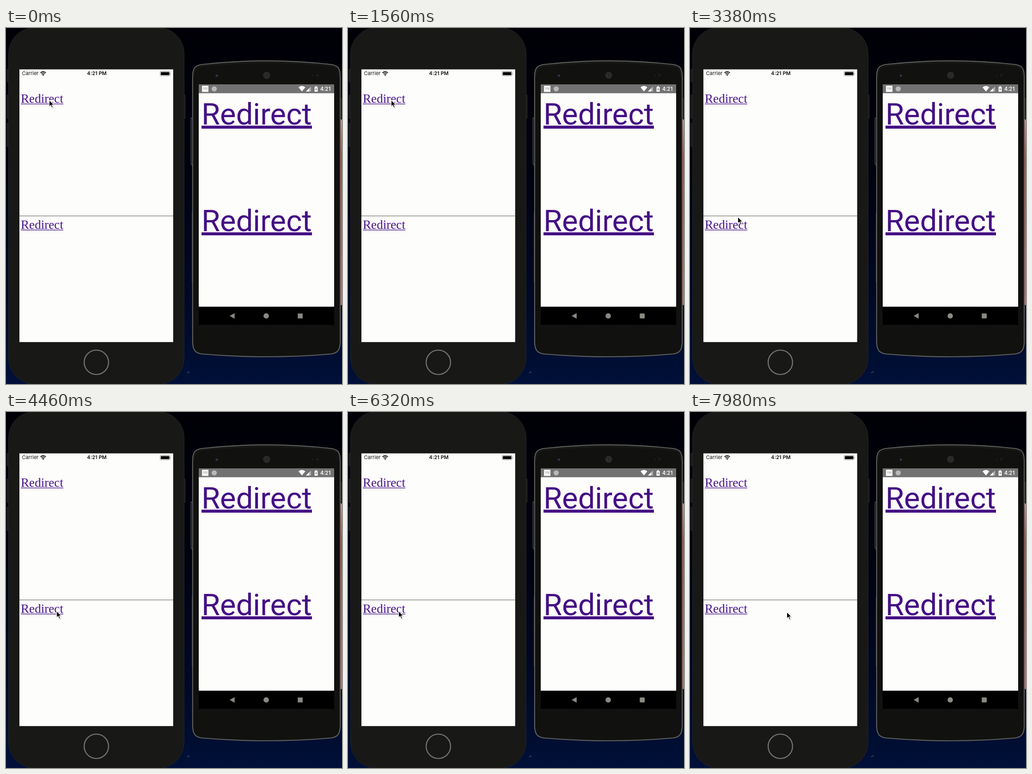
Animation, 727 px wide and 771 px high, one loop 8 s. Source, as an HTML page:

```html
<!DOCTYPE html>
<html lang="en">
<head>
<meta charset="utf-8">
<title>Redirect links on two phones</title>
<style>
  html, body { margin: 0; width: 100%; height: 100%; overflow: hidden; background: #000008; }
  svg { display: block; width: 100%; height: 100%; }
  .ui { font-family: Inter, "Liberation Sans", sans-serif; font-size: 11px; fill: #111; }
  .serif { font-family: "Liberation Serif", serif; font-size: 27.15px; fill: #48148a; }
  .roboto { font-family: Roboto, sans-serif; font-size: 65.1px; fill: #451084; }
  .clock { font-family: Roboto, sans-serif; font-size: 12.2px; font-weight: 500; fill: #fff; }
  .tiny { font-family: Roboto, sans-serif; font-size: 4.5px; fill: #777; }
</style>
</head>
<body>
<svg viewBox="0 0 727 771" xmlns="http://www.w3.org/2000/svg">
  <defs>
    <linearGradient id="night" x1="0" y1="0" x2="0" y2="1">
      <stop offset="0" stop-color="#000006"/>
      <stop offset=".4" stop-color="#00020f"/>
      <stop offset=".75" stop-color="#000824"/>
      <stop offset="1" stop-color="#001038"/>
    </linearGradient>
    <linearGradient id="coral" x1="0" y1="0" x2="0" y2="1">
      <stop offset="0" stop-color="#e88078"/>
      <stop offset=".2" stop-color="#d8402f"/>
      <stop offset="1" stop-color="#dc6258"/>
    </linearGradient>
    <g id="link">
      <text class="serif" x="32" y="162">Redirect</text>
      <rect x="32" y="163.8" width="92" height="1.4" fill="#48148a"/>
    </g>
    <g id="bigLink">
      <text class="roboto" x="423" y="209.3">Redirect</text>
      <rect x="423" y="211.5" width="239" height="6.5" fill="#451084"/>
    </g>
  </defs>

  <rect width="727" height="771" fill="url(#night)"/>
  <rect x="724" y="198" width="3" height="402" fill="url(#coral)"/>
  <path d="M392 747l5-3" stroke="#77809a"/>

  <!-- left phone -->
  <g fill="#191919" stroke="#2b2b2d" stroke-width=".8">
    <rect x="2" y="89" width="6" height="28" rx="1"/>
    <rect x="2" y="145" width="6" height="51" rx="1"/>
    <rect x="2" y="206" width="6" height="51" rx="1"/>
    <rect x="382" y="145" width="6" height="51" rx="1"/>
  </g>
  <rect x="5.5" y="-1" width="380" height="773" rx="57" fill="#181817" stroke="#252526"/>
  <circle cx="195.5" cy="724" r="26.4" fill="none" stroke="#717171" stroke-width="2.4"/>
  <rect x="29" y="89.6" width="332.7" height="590.6" fill="#fdfdfc"/>
  <text class="ui" x="34.5" y="102.4">Carrier</text>
  <g fill="none" stroke="#000" stroke-width="1.9">
    <path d="M74.6 97.2a8.2 8.2 0 0 1 11.6 0"/>
    <path d="M76.8 99.6a5.1 5.1 0 0 1 7.2 0"/>
  </g>
  <path d="M78.3 101.2a3 3 0 0 1 4.2 0l-2.1 2.2z"/>
  <text class="ui" x="196.5" y="102.4" text-anchor="middle" font-weight="600">4:21 PM</text>
  <rect x="333.5" y="94" width="21.4" height="9.6" rx="2.4" fill="none" stroke="#777" stroke-width=".9"/>
  <rect x="335" y="95.5" width="18.4" height="6.6" rx="1.2"/>
  <path d="M356 97.2q1.4 1.6 0 3.2z" fill="#666"/>
  <rect x="29" y="406.5" width="332.7" height="1" fill="#555"/>
  <use href="#link"/>
  <use href="#link" y="273"/>
  <rect id="tap" x="29" y="134" width="97.5" height="36.5" fill="#000" opacity=".33"/>

  <!-- right phone -->
  <path d="M404 195h-3.5v99l3.5 5M403 400v150" fill="none" stroke="#555" stroke-width="1.4"/>
  <path d="M723 152h2.5v44h-2.5" fill="none" stroke="#3a3a3a"/>
  <path d="M403.800 106C403.800 87 409 81 424 79Q494 71.200 563.500 71.200T703 79C718 81 723.200 87 723.200 106V678C723.200 697 718 704 703 706Q633 712 563.500 712T424 706C409 704 403.800 697 403.800 678Z"
        fill="#111110" stroke="#5e5e5a" stroke-width="2.2"/>
  <path d="M407 106C407 90 411 84.500 425 82.500Q494 74.700 563.500 74.700T702 82.500C716 84.500 720 90 720 106" fill="none" stroke="#252525"/>
  <circle cx="455.5" cy="103.5" r="3.6" fill="#1b1b2a"/>
  <circle cx="456.5" cy="103" r="1.2" fill="#66667c"/>
  <circle cx="564" cy="102.5" r="7.5" fill="#303030"/>
  <circle cx="564" cy="102.5" r="5" fill="none" stroke="#191919" stroke-width="1.6" stroke-dasharray="1.6 1.4"/>
  <circle cx="564" cy="102.5" r="1.6" fill="#191919"/>
  <circle cx="664" cy="102.5" r="2" fill="#1c1c1b"/>
  <circle cx="674" cy="102.5" r="3" fill="#1c1c1b"/>

  <rect x="417" y="122" width="293" height="521"/>
  <rect x="417" y="122" width="293" height="19.5" fill="#727272"/>
  <rect x="417" y="141.2" width="293" height="462.4" fill="#fdfdfc"/>
  <rect x="424" y="125" width="14" height="13.5" fill="#f4f4f4"/>
  <text class="tiny" x="431" y="133.3" text-anchor="middle">1102</text>
  <circle cx="450.5" cy="131.8" r="5.6" fill="#b8b8b8"/>
  <g fill="#fff">
    <path d="M633 128.4Q640.3 122.8 647.6 128.4L640.3 137.6Z"/>
    <path d="M649 137.4L660 126.4V137.4Z" fill="#b0b0b0"/>
    <path d="M649 137.4L656 130.4V137.4Z"/>
    <path d="M667.6 127.4h2v-1.4h2.8v1.4h2v10.6h-6.8z"/>
  </g>
  <path d="M671.5 129l-2.3 4.2h1.500v3l2.2-4.2h-1.4z" fill="#727272"/>
  <text class="clock" x="680" y="136">4:21</text>
  <use href="#bigLink"/>
  <use href="#bigLink" y="231"/>
  <g fill="#8a8a82">
    <path d="M484 623.5L494.7 617.5V629.5Z"/>
    <circle cx="563" cy="623.5" r="5.8"/>
    <rect x="631.3" y="618.3" width="10.6" height="10.6"/>
  </g>

  <g id="cursor">
    <path d="M.5 1.500V15.500L3.5 13L6 18.500L9.500 17L7.200 12H11.500Z" opacity=".22"/>
    <path d="M0 0V14.2L3.3 11.2L5.6 16.4L8 15.4L5.7 10.3H10.2Z"
          stroke="#fff" stroke-width="1.1" stroke-linejoin="round"/>
  </g>
</svg>
<script>
const LOOP = 8000;
const tap = document.getElementById('tap');
const cursor = document.getElementById('cursor');

// pointer stops: time, x, y
const stops = [
  [0, 93.5, 156], [2420, 93.5, 156], [2520, 96.5, 175],
  [3380, 103.5, 409], [3560, 109.5, 431], [7500, 109.5, 431], [7980, 209.5, 433]
];
const highlight = [2240, 2760];

const ease = u => u * u * (3 - 2 * u);

function pointerAt(t) {
  const i = stops.findIndex(s => s[0] > t);
  if (i < 0) return stops[stops.length - 1].slice(1);
  const [t0, x0, y0] = stops[i - 1], [t1, x1, y1] = stops[i];
  const k = ease((t - t0) / (t1 - t0));
  return [x0 + (x1 - x0) * k, y0 + (y1 - y0) * k];
}

function draw(t) {
  const [x, y] = pointerAt(t);
  cursor.setAttribute('transform', `translate(${x.toFixed(2)} ${y.toFixed(2)})`);
  const on = t >= highlight[0] && t < highlight[1];
  tap.setAttribute('visibility', on ? 'visible' : 'hidden');
}

const start = performance.now();
function tick() {
  draw((performance.now() - start) % LOOP);
  requestAnimationFrame(tick);
}
draw(0);
requestAnimationFrame(tick);
</script>
</body>
</html>
```
